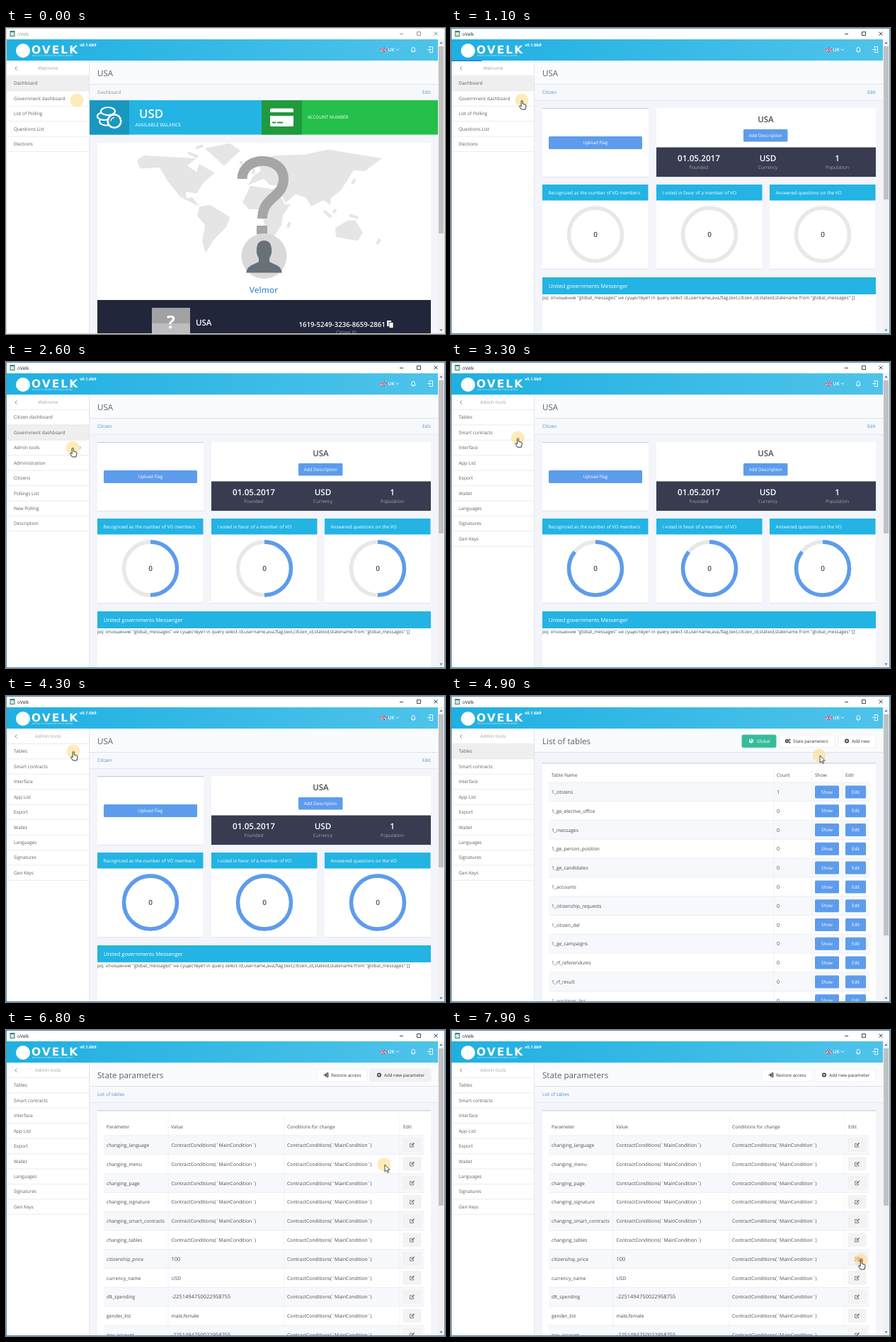
Write an HTML page that moves like this. It is 620 by 432 pixels and loops after 8000 ms.

```html
<!DOCTYPE html>
<html lang="en">
<head>
<meta charset="utf-8">
<title>Dashboard tour</title>
<style>
html, body { margin: 0; width: 100%; height: 100%; overflow: hidden; background: #fff }
svg { display: block; width: 620px; height: 432px; font-family: "Open Sans", "Noto Sans", sans-serif; text-rendering: geometricPrecision; white-space: pre }
</style>
</head>
<body>
<svg id="stage" viewBox="0 0 620 432"></svg>
<script>
const CYAN = '#23b4e3', BLUE = '#5d9cec', INK = '#4a4b4d', LINK = '#4d90c8', LAND = '#e5e5e5';
const stage = document.getElementById('stage');

// markup helpers
const rect = (x, y, w, h, fill, more = '') => `<rect x="${x}" y="${y}" width="${w}" height="${h}" fill="${fill}" ${more}/>`;
const circle = (x, y, r, fill, more = '') => `<circle cx="${x}" cy="${y}" r="${r}" fill="${fill}" ${more}/>`;
const shape = (d, fill, more = '') => `<path d="${d}" fill="${fill}" ${more}/>`;
const line = (d, color, width = 1, more = '') => `<path d="${d}" fill="none" stroke="${color}" stroke-width="${width}" ${more}/>`;
const text = (x, y, s, size = 6.5, fill = INK, more = '') => `<text x="${x}" y="${y}" font-size="${size}" fill="${fill}" ${more}>${s}</text>`;
const MID = 'text-anchor="middle"', BOLD = 'font-weight="600"';
const group = (id, body) => `<g id="${id}">${body}</g>`;
const button = (x, y, w, h, label, fill = BLUE) => rect(x, y, w, h, fill, 'rx="1.5"') + text(x + w / 2, y + h / 2 + 2.2, label, 6.3, '#fff', MID);
const card = (x, y, w, h) => rect(x, y + 1, w, h, '#dfe3ea', 'rx="1"') + rect(x, y, w, h, '#fff', 'rx="1"');
const heading = s => rect(118, 46, 492, 33, '#fafbfd') + line('M118 79.5H610', '#dde1ea') + text(129, 68, s, 11.6, '#5f6164');
const crumb = (s, color, edit) => rect(118, 80, 492, 22, '#f7f8fc') + line('M118 102.5H610', '#e4e7ef')
  + text(129, 93.3, s, 6.5, color) + (edit ? text(588, 93.3, 'Edit', 6.5, LINK) : '');

function frameParts() {
  const controls = line('M556 8.5H561M580.5 5.5h5v5h-5zM604.5 5.5l5 5M609.5 5.5l-5 5', '#333', .9, 'id="controls"');
  const flag = rect(529, 28, 8.5, 5.5, '#35508f') + line('M529 28l8.5 5.5M537.5 28L529 33.5', '#fff', 1)
    + line('M533.2 28v5.5M529 30.8h8.5', '#fff', 1.8) + line('M533.2 28v5.5M529 30.8h8.5', '#d8334a', 1);
  const icons = line('M551 29.5l2 2 2-2M572 33h6.4M573 33v-3q0-2.8 2.2-2.8t2.2 2.8v3M574.5 34.3h1.5M598 28v-1.5h4.5v8H598v-1.5M595 30.5h5M598 28.5l2 2-2 2', '#fff', .9);
  return rect(0, 0, 620, 16, '#fff') + rect(5.5, 4, 7, 8, '#3b7f78') + rect(6.5, 6, 5, 5, '#d5e6df')
    + text(16, 10.6, 'oVelk', 6.5, '#222', 'id="title"') + controls
    + rect(1, 16, 609, 30, 'url(#bar)')
    + circle(24, 32, 10, '#fff')
    + text(36, 36.3, 'OVELK', 15.5, '#fff', 'font-weight="700" letter-spacing="2" style="font-family:\'DejaVu Sans\',sans-serif"')
    + text(37, 39.8, 'DIGITAL PLATFORM FOR PUBLIC WORKS', 3.1, '#d9f2fb')
    + text(104, 26, 'v0.1.6b9', 5.8, '#fff', 'font-weight="700"')
    + flag + text(539.5, 33, 'UK', 6.6, '#fff', BOLD) + icons
    + rect(610, 16, 9, 415, '#f1f1f1') + rect(611, 26, 7, 10, '#c1c1c1', 'id="thumb"')
    + shape('M612.5 22l2-2.5 2 2.5zM612.5 425.5l2 2.5 2-2.5z', '#666');
}

function menu(id, title, items, active, arrowRow = -1) {
  const top = i => 67.3 + 21.45 * i;
  return group(id, rect(1, 46, 117, 385, '#fff') + line('M15.3 54.5l-2.3 2.5 2.3 2.5', '#666', .8)
    + text(59.5, 59.4, title, 6.5, '#a0a2a5', MID) + line('M1 67.3H118', '#e6e6e6', .8)
    + rect(1, top(active), 117, 21.45, '#efefef', `id="${id}on"`)
    + items.map((s, i) => text(11, top(i) + 13, s, 6.5, '#5c5e60')
      + line(`M1 ${top(i + 1)}H118`, '#e8e8e8', .8)
      + (i == arrowRow ? line(`M103.5 ${top(i) + 8.5}l2 2.3-2 2.3`, '#888', .8) : '')).join('')
    + line('M117.6 46V431', '#dcdfe6', .8));
}

// coarse coastlines as longitude, latitude pairs
function worldMap() {
  const coasts = [
    '-166 66 -156 71 -128 70 -82 68 -95 60 -82 53 -78 62 -56 52 -66 45 -75 37 -81 26 -97 28 -96 19 -88 21 -78 8 -94 16 -106 22 -124 44 -134 58 -162 57',
    '-70 78 -35 83 -20 76 -43 60',
    '-78 8 -62 10 -35 -7 -40 -21 -58 -38 -69 -54 -74 -40 -70 -18 -81 -5',
    '-9 37 -2 48 9 55 5 60 14 67 28 71 70 72 104 77 180 68 156 54 140 55 122 30 108 20 107 10 97 17 80 8 73 20 58 25 44 13 34 30 36 36 22 37 13 45',
    '-6 36 32 31 43 11 51 11 40 -4 38 -18 27 -34 18 -34 9 4 -8 4 -17 14',
    '114 -22 131 -12 142 -11 153 -28 146 -39 115 -34'];
  const project = (lon, lat) => `${351 + lon} ${(260 - lat - lat ** 3 / 40000).toFixed(1)}`;
  const outline = s => {
    const n = s.split(' ').map(Number);
    return 'M' + n.filter((_, i) => i % 2 == 0).map((lon, i) => project(lon, n[2 * i + 1])).join('L') + 'Z';
  };
  const isles = 'M349 206l1-7M449 258l10 9M462 261l4-5M485 264l12 4M489 220l4-7M398 282l3-8M524 305l4-7M257 176l14 6M268 170l10-4M330 190l4 0';
  return shape(coasts.map(outline).join(''), LAND) + line(isles, LAND, 4);
}

function citizenPage() {
  const coins = [[142, 132], [139, 124.5], [144, 117.5]].map(([x, y]) =>
    `<ellipse cx="${x}" cy="${y}" rx="10" ry="5.5" fill="#1a97bf" stroke="#fff" stroke-width="2.2"/>`).join('')
    + circle(153, 131.5, 9.3, '#1a97bf', 'stroke="#fff" stroke-width="2.6"') + line('M148 131.5a5 5 0 0 1 5-5', '#fff', 1.3);
  const bust = shape('M339 345.500q1-9 12-12.500l6-3v-5q-4-6-3-14 1-11 10.500-11t10.500 11q1 8-3 14v5l6 3q11 3.500 12 12.500z', '#687078');
  return heading('USA') + crumb('Dashboard', '#8b8e93', true)
    + rect(118, 102, 243, 48.5, CYAN) + rect(118, 102, 56, 48.5, '#1a97bf') + coins
    + rect(361, 102, 249, 48.5, '#25bf4b') + rect(361, 102, 57, 48.5, '#1f9a3d')
    + rect(373, 113.5, 33, 25.5, '#fff', 'rx="2"') + rect(373, 119, 33, 5, '#1f9a3d') + line('M376 133.5h5M383 133.5h8', '#1f9a3d', 2)
    + text(188, 126.8, 'USD', 16.8, '#fff', BOLD) + text(182.5, 138.8, 'AVAILABLE BALANCE', 6.8, '#fff')
    + text(426, 127.5, 'ACCOUNT NUMBER', 6.3, '#fff')
    + card(129, 162, 471, 260) + worldMap()
    + line('M333.5 213C334 179 392 180 392 213C392 240 362 238 362 269', '#a6a6a6', 14) + rect(354, 279, 15, 12, '#a6a6a6')
    + circle(364.5, 322, 32, '#d9d9d9') + bust
    + text(364, 374, 'Velmor', 11.7, '#4a94d8', MID + ' ' + BOLD)
    + rect(129, 384, 471, 47, '#22263a')
    + rect(206, 395, 54, 36, '#a2a2a4') + rect(206, 417, 54, 14, '#bdbdbf') + text(233, 424, '?', 25, '#fff', MID + ' font-weight="700"')
    + text(268, 420.3, 'USA', 11.5, '#fff', BOLD)
    + text(413.5, 422.3, '1619-5249-3236-8659-2861', 9.65, '#fff', BOLD)
    + rect(538, 413, 6, 8, '#fff') + rect(541, 415.5, 6, 8, '#fff', 'stroke="#22263a" stroke-width=".8"')
    + text(480.5, 431.5, 'Citizen ID', 6.5, '#a3a6b2', MID);
}

function statePage() {
  const facts = [[350, '01.05.2017', 'Founded'], [447.5, 'USD', 'Currency'], [545.5, '1', 'Population']];
  const rings = [[129, 'Recognized as the number of VO members'], [290, 'I voted in favor of a member of VO'], [450, 'Answered questions on the VO']];
  return heading('USA') + crumb('Citizen', LINK, true)
    + card(129, 113, 150, 97) + rect(129, 113, 150, 1.2, '#c5cde2') + button(138, 153, 132, 18, 'Upload Flag')
    + card(290, 113, 310, 97) + text(444.5, 132.5, 'USA', 11.5, INK, MID + ' ' + BOLD) + button(413, 143, 62.5, 17.5, 'Add Description')
    + rect(290, 168.5, 310, 41.5, '#393c50')
    + facts.map(([x, v, label]) => text(x, 188, v, 11.7, '#fff', MID + ' ' + BOLD) + text(x, 199, label, 6.5, '#9fa2ae', MID)).join('')
    + rings.map(([x, label]) => {
      const cx = x + 75;
      return card(x, 221, 149.5, 119) + rect(x, 221, 149.5, 22.5, CYAN) + text(x + 8.5, 234.7, label, 6.5, '#fff')
        + circle(cx, 291.5, 37.5, 'none', 'stroke="#e8e8e8" stroke-width="5.5"')
        + circle(cx, 291.5, 37.5, 'none', `class="ring" pathLength="100" stroke="${BLUE}" stroke-width="5.5" transform="rotate(-90 ${cx} 291.5)"`)
        + text(cx, 295.3, '0', 10, INK, MID + ' ' + BOLD);
    }).join('')
    + card(129, 352, 471, 80) + rect(129, 352, 471, 24, CYAN) + text(138, 366.8, 'United governments Messenger', 7.5, '#fff')
    + text(129, 383, 'pq: отношение "global_messages" не существует in query select id,username,ava,flag,text,citizen_id,stateid,statename from "global_messages" []', 6.5);
}

function table(top, headHeight, dividers, heads, rows, cell) {
  const pitch = 26.8, first = top + headHeight;
  return card(129, top, 471, 440) + rect(129, top, 471, 1.5, '#cfd8e4')
    + heads.map(([x, s]) => text(x, first - headHeight * .28, s, 6.6)).join('')
    + rows.map((r, i) => {
      const y = first + pitch * i;
      return rect(138, y, 453, pitch, i % 2 ? '#fff' : '#f7f8fc') + line(`M138 ${y}H591`, '#e9ebf1', .8) + cell(r, y + pitch / 2);
    }).join('') + dividers.map(x => line(`M${x} ${top + 9}V432`, '#eef0f5', .8)).join('');
}

const toolButton = (x, w, label, tx, icon, fill = '#fff', color = '#333', more = '') =>
  rect(x, 55, w, 17.5, fill, `rx="1.5" stroke="${fill == '#fff' ? '#eceef2' : fill}" stroke-width=".8" ${more}`) + icon + text(tx, 66, label, 6.2, color);
const plus = x => circle(x, 63.5, 3, '#333') + line(`M${x - 1.8} 63.5h3.6M${x} 61.7v3.6`, '#fff', 1);

function tablesPage() {
  const names = '1_citizens 1_ge_elective_office 1_messages 1_ge_person_position 1_ge_candidates 1_accounts 1_citizenship_requests 1_citizen_del 1_ge_campaigns 1_rf_referendums 1_rf_result 1_positions_list'.split(' ');
  const globe = circle(424, 63.5, 3, '#fff') + shape('M422 62l2-1 1 2-2 1zM424.5 65l1.5-1v1.5z', '#37bc9b');
  const gears = circle(474.5, 63.5, 1.8, 'none', 'stroke="#333" stroke-width="1.5"')
    + circle(478.3, 61.7, .9, 'none', 'stroke="#333"') + circle(478.3, 65.5, .9, 'none', 'stroke="#333"');
  return heading('List of tables')
    + toolButton(411, 48, 'Global', 432, globe, '#37bc9b', '#fff')
    + toolButton(464, 78, 'State parameters', 483, gears) + toolButton(547, 53, 'Add new', 566, plus(559))
    + table(94, 28, [456, 509.5, 552.5], [[142, 'Table Name'], [460, 'Count'], [514, 'Show'], [557, 'Edit']], names, (s, y) =>
      text(142, y + 2.5, s, 6.75) + text(460, y + 2.5, s == '1_citizens' ? 1 : 0, 7.3)
      + button(514, y - 9, 34, 18, 'Show') + button(557, y - 9, 29, 18, 'Edit'));
}

function paramsPage() {
  const rule = 'ContractConditions(`MainCondition`)', account = '-2251494750022958755';
  const rows = ['language', 'menu', 'page', 'signature', 'smart_contracts', 'tables'].map(s => ['changing_' + s, rule])
    .concat([['citizenship_price', '100'], ['currency_name', 'USD'], ['dlt_spending', account], ['gender_list', 'male,female'], ['gov_account', account]]);
  const enter = line('M448.5 63.5h4M451 61.5l2 2-2 2M452.5 60.8h2.2v5.4h-2.2', '#333', 1.2);
  const pencil = y => line(`M575.5 ${y + .5}v2.3h-5v-5h3`, '#666', .8) + line(`M572.8 ${y + .8}l3.7-3.7`, '#555', 1.3);
  return heading('State parameters') + crumb('List of tables', LINK)
    + toolButton(439, 71, 'Restore access', 459, enter)
    + toolButton(514, 86, 'Add new parameter', 534, plus(527), '#fff', '#333', 'id="addNew"')
    + table(113, 36, [229, 393, 556], [[142, 'Parameter'], [233, 'Value'], [397, 'Conditions for change'], [561, 'Edit']], rows, ([name, value], y) =>
      text(142, y + 2.5, name, 6.75) + text(233.5, y + 2.5, value, /\d/.test(value) ? 7.5 : 6.8) + text(397, y + 2.5, rule, 6.8)
      + rect(561, y - 9.5, 25, 18.5, '#f3f3f4', 'rx="1.5" stroke="#ebebed" stroke-width=".6"') + pencil(y));
}

stage.innerHTML = `<defs><linearGradient id="bar"><stop stop-color="#1fb0e1"/><stop offset="1" stop-color="#4fc3ea"/></linearGradient></defs>`
  + rect(0, 0, 620, 432, '#f4f5fa')
  + [citizenPage, statePage, tablesPage, paramsPage].map((page, i) => group('page' + i, page())).join('')
  + menu('menu0', 'Welcome', ['Dashboard', 'Government dashboard', 'List of Polling', 'Questions List', 'Elections'], 0)
  + menu('menu1', 'Welcome', ['Citizen dashboard', 'Government dashboard', 'Admin tools', 'Administration', 'Citizens', 'Pollings List', 'New Polling', 'Description'], 1, 2)
  + menu('menu2', 'Admin tools', ['Tables', 'Smart contracts', 'Interface', 'App List', 'Export', 'Wallet', 'Languages', 'Signatures', 'Gen Keys'], 0)
  + frameParts() + rect(0, 45, 0, 2, '#2f86d8', 'id="load"')
  + rect(.5, .5, 619, 431, 'none', 'id="border"')
  + group('pointer', circle(0, 0, 9.5, '#fbdf8c', 'opacity=".6"') + circle(0, 0, 3, '#e8684a', 'id="press" opacity=".8"')
    + shape('M1 0V10L3.3 8 5 11.5 6.5 10.8 5 7.3H8Z', '#fff', 'id="arrow" stroke="#222" stroke-width=".8"')
    + shape('M-.8 1Q.2-.8 1.3 1V5L5 6Q6 6.3 6 8L5 13H-.5L-3.5 8.5Q-3.5 6.8-.8 8.5Z', '#fff', 'id="hand" stroke="#222" stroke-width=".9"'));

const el = id => document.getElementById(id);
const show = (id, on) => el(id).style.display = on ? '' : 'none';
const set = (id, name, value) => el(id).setAttribute(name, value);
const ease = p => p < .5 ? 2 * p * p : 1 - 2 * (1 - p) ** 2;
const during = (t, spans) => spans.find(([a, b]) => t >= a && t < b);
const stepAt = (t, starts) => starts.filter(s => t >= s).length;

// time, x, y of the pointer tip
const path = [[0, 100, 102], [1500, 100, 102], [2200, 94, 121], [3100, 94, 121], [3600, 95, 78], [4500, 95, 78], [4900, 520, 84],
  [5200, 505, 64], [5900, 505, 64], [6800, 534, 190], [7700, 579, 325], [8000, 579, 325]];

function pointerAt(t) {
  const i = path.findIndex(k => k[0] > t), [a, x, y] = path[i - 1], [b, u, v] = path[i];
  const p = ease((t - a) / (b - a));
  return [x + (u - x) * p, y + (v - y) * p];
}

function draw(now) {
  const t = Math.floor(now % 8000 / 100) * 100;
  const page = stepAt(t, [900, 4600, 5700]), side = stepAt(t, [1300, 3000]), focused = t >= 500;
  for (let i = 0; i < 4; i++) show('page' + i, i == page);
  for (let i = 0; i < 3; i++) show('menu' + i, i == side);
  show('menu2on', t >= 4500 && t < 5700);
  set('addNew', 'fill', t >= 6100 && t < 7300 ? '#f1f1f2' : '#fff');
  set('title', 'fill', focused ? '#222' : '#999');
  set('controls', 'stroke', focused ? '#333' : '#888');
  set('border', 'stroke', focused ? '#4b93bd' : '#cfcfcf');
  set('thumb', 'height', [264, 216, 312, 222][page]);

  const ring = 100 * ease(Math.min(1, Math.max(0, (t - 1100) / 3000)));
  document.querySelectorAll('.ring').forEach(r => {
    r.setAttribute('stroke-dasharray', ring + ' 200');
    r.style.display = ring ? '' : 'none';
  });
  const load = during(t, [[900, 1400], [4500, 4800], [5500, 5800]]);
  set('load', 'width', load ? 620 * ((t - load[0]) / (load[1] - load[0])) ** 2.9 : 0);

  const [x, y] = pointerAt(t);
  const hand = x < 118 || (page == 2 && y < 73) || (x > 561 && y > 150);
  set('pointer', 'transform', `translate(${x} ${y})`);
  show('hand', hand && t >= 100);
  show('arrow', !hand);
  show('press', during(t, [[500, 700], [2900, 3100], [4400, 4600], [5400, 5600], [7800, 8000]]));
}

const start = performance.now();
function tick() {
  draw(performance.now() - start);
  requestAnimationFrame(tick);
}
tick();
</script>
</body>
</html>
```
